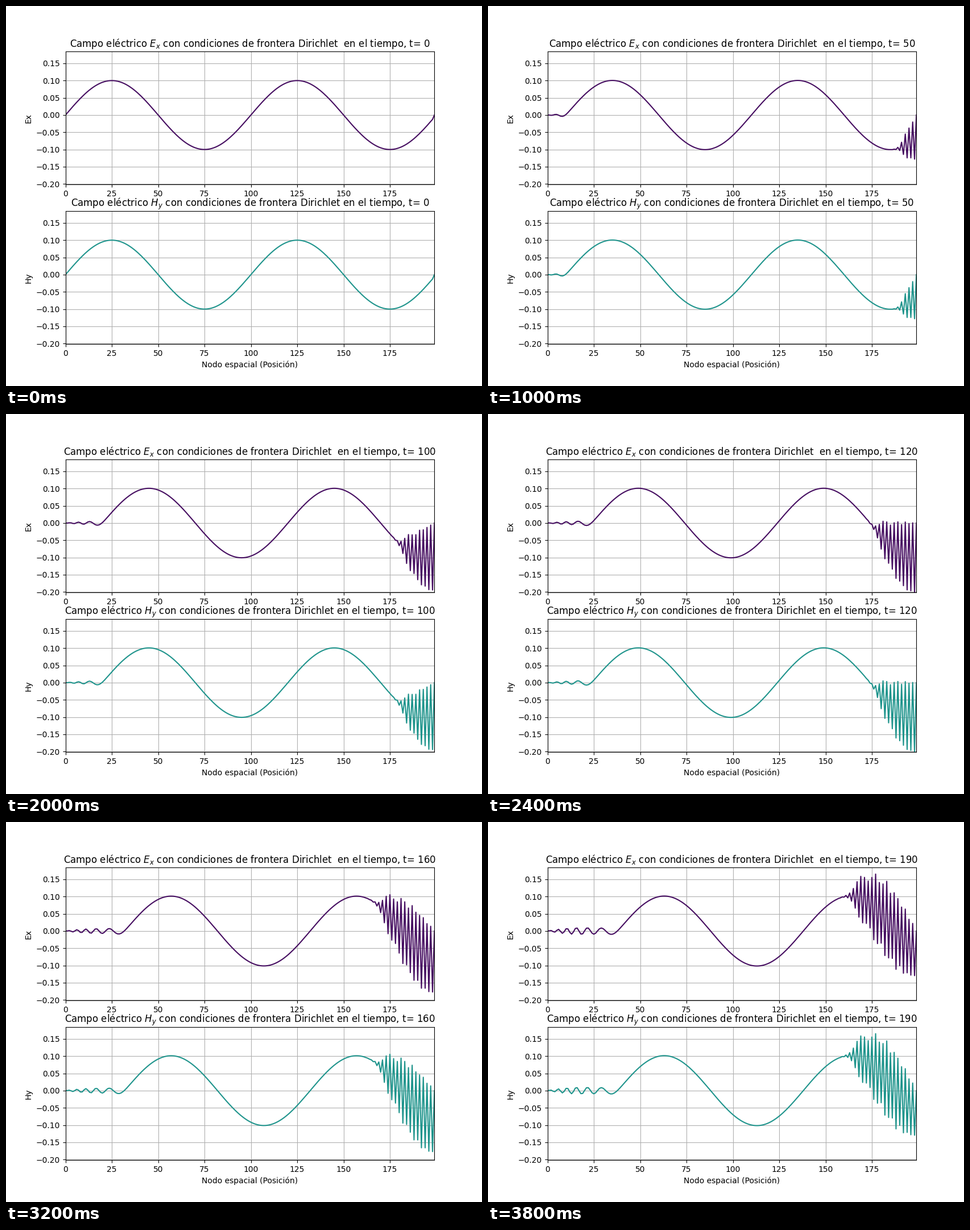
Animation, 837 px wide and 669 px high, one loop 4 s. Source, as a matplotlib script:

```python
import numpy as np
import matplotlib.pyplot as plt
from matplotlib.animation import FuncAnimation

NODES = 200
STEPS_PER_FRAME = 10
FRAMES = 20
COURANT = 0.2


def simulate():
    """Forward-time, centred-space coupled fields with both ends held at zero."""
    x = np.arange(NODES)
    ex = 0.1 * np.sin(2 * np.pi * x / 100)
    ex[0] = ex[-1] = 0
    hy = ex.copy()
    states = []
    for step in range(FRAMES * STEPS_PER_FRAME):
        if step % STEPS_PER_FRAME == 0:
            states.append((ex.copy(), hy.copy()))
        d_ex = ex[2:] - ex[:-2]
        d_hy = hy[2:] - hy[:-2]
        ex[1:-1] -= COURANT / 2 * d_hy
        hy[1:-1] -= COURANT / 2 * d_ex
    return x, states


x, states = simulate()

plt.rcParams["font.family"] = "DejaVu Sans"
# The small excess keeps the pixel size from rounding down.
fig, axes = plt.subplots(2, 1, figsize=(8.3701, 6.6901), dpi=100)

titles = (
    "Campo eléctrico $E_x$ con condiciones de frontera Dirichlet  en el tiempo, t= {}",
    "Campo eléctrico $H_y$ con condiciones de frontera Dirichlet en el tiempo, t= {}",
)
colors = ("#460e61", "#1f948c")

lines = []
for ax, color, label in zip(axes, colors, ("Ex", "Hy")):
    lines += ax.plot(x, np.zeros(NODES), color=color, lw=1.5)
    ax.set_xlim(0, NODES - 1)
    ax.set_ylim(-0.2019, 0.1841)
    ax.set_yticks(np.arange(-4, 4) * 0.05)
    ax.set_ylabel(label)
    ax.grid(True)
axes[1].set_xlabel("Nodo espacial (Posición)")


def update(frame):
    for ax, line, title, field in zip(axes, lines, titles, states[frame]):
        line.set_ydata(field)
        ax.set_title(title.format(frame * STEPS_PER_FRAME))
    return lines


anim = FuncAnimation(fig, update, frames=FRAMES, interval=200, repeat=True, repeat_delay=0)
plt.show()
```
